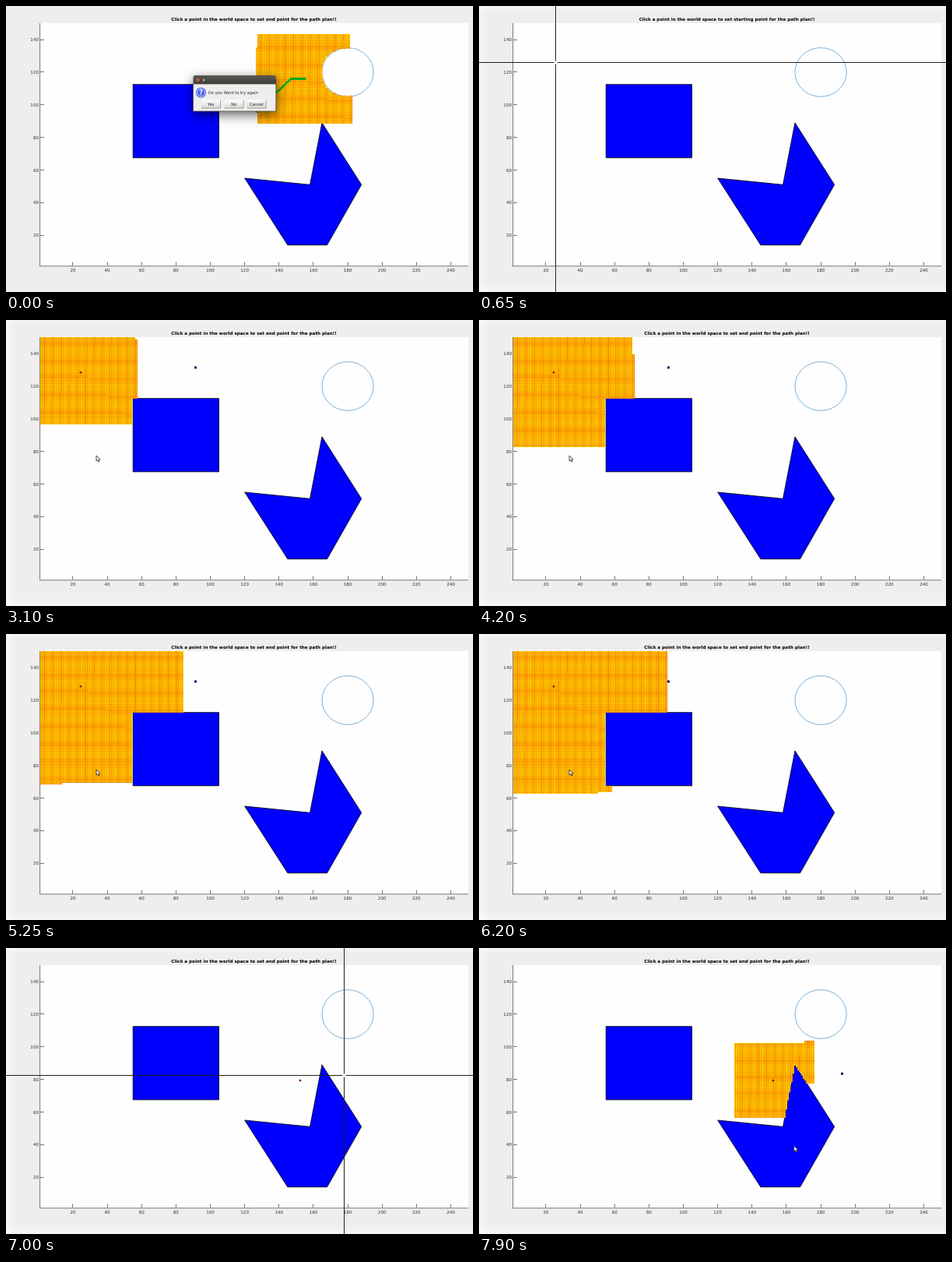
Write an HTML page with a canvas that moves like this. It is 600 px wide and 367 px high and loops after 8 s.

```html
<!DOCTYPE html>
<html lang="en">
<head>
<meta charset="utf-8">
<title>Path planner</title>
<style>
html, body { margin: 0; width: 100%; height: 100%; overflow: hidden; background: #efeeec; }
canvas { display: block; width: 600px; height: 367px; }
</style>
</head>
<body>
<canvas id="stage" width="600" height="367"></canvas>
<script>
const W = 600, H = 367, LOOP = 8000;
const COLS = 250, ROWS = 150;
const ctx = document.getElementById('stage').getContext('2d');
const SANS = '"DejaVu Sans", sans-serif';

// World to pixel
const UX = 2.207, UY = 2.092;
const px = x => 41.8 + x * UX;
const py = y => 336 - y * UY;

const POLY = [[120, 55], [158, 51], [165, 89], [188, 51], [168, 14], [145, 14]];

function inPoly(x, y) {
  let hit = false;
  POLY.forEach(([ax, ay], i) => {
    const [bx, by] = POLY[(i + 1) % POLY.length];
    if ((ay > y) !== (by > y) && x < ax + (y - ay) * (bx - ax) / (by - ay)) hit = !hit;
  });
  return hit;
}

function blocked(x, y) {
  if (x < 1 || y < 1 || x > COLS || y > ROWS) return true;
  if (x >= 55 && x <= 105 && y > 67 && y < 113) return true;
  if ((x - 180) ** 2 + (y - 120) ** 2 <= 225) return true;
  return inPoly(x, y);
}

// Breadth-first search over eight neighbours, counter-clockwise from west
const STEPS = [[-1, 0], [-1, -1], [0, -1], [1, -1], [1, 0], [1, 1], [0, 1], [-1, 1]];
const key = (x, y) => y * 256 + x;

function search(sx, sy) {
  const order = [[sx, sy]];
  const rank = new Map([[key(sx, sy), 0]]);
  const parent = [-1];
  for (let i = 0; i < order.length; i++) {
    const [x, y] = order[i];
    for (const [dx, dy] of STEPS) {
      const nx = x + dx, ny = y + dy, k = key(nx, ny);
      if (rank.has(k) || blocked(nx, ny)) continue;
      rank.set(k, order.length);
      parent.push(i);
      order.push([nx, ny]);
    }
  }
  const layer = document.createElement('canvas');
  layer.width = W;
  layer.height = H;
  const pen = layer.getContext('2d');
  pen.beginPath();
  pen.rect(44, 22, 550, 312);
  pen.clip();
  return { order, parent, layer, pen, drawn: 0, at: (x, y) => rank.get(key(x, y)) + 1 };
}

function drawSearch(s, count) {
  count = Math.floor(count);
  const g = s.pen;
  if (count < s.drawn) {
    g.clearRect(0, 0, W, H);
    s.drawn = 0;
  }
  for (; s.drawn < count; s.drawn++) {
    const [x, y] = s.order[s.drawn];
    const left = Math.round(px(x - 0.5)), top = Math.round(py(y + 0.5));
    g.fillStyle = '#f63c00';
    g.fillRect(left, top, Math.round(px(x + 0.5)) - left, Math.round(py(y - 0.5)) - top);
    g.fillStyle = '#fcec00';
    g.fillRect(px(x) - 0.92, py(y) - 0.87, 1.84, 1.74);
  }
  ctx.drawImage(s.layer, 0, 0);
}

function drawPath(s, x, y) {
  ctx.fillStyle = '#00a818';
  for (let i = s.at(x, y) - 1; i >= 0; i = s.parent[i]) {
    const [cx, cy] = s.order[i];
    ctx.fillRect(px(cx) - 1.5, py(cy) - 1.5, 3, 3);
  }
}

// Piecewise linear value; keys are [time, value]
function track(keys, t) {
  if (t <= keys[0][0]) return keys[0][1];
  for (let i = 1; i < keys.length; i++) {
    const [t0, a] = keys[i - 1], [t1, b] = keys[i];
    if (t < t1) return a + (b - a) * (t - t0) / (t1 - t0);
  }
  return keys[keys.length - 1][1];
}

const move = (keys, t) => [1, 2].map(n => track(keys.map(k => [k[0], k[n]]), t));

function line(x0, y0, x1, y1) {
  ctx.beginPath();
  ctx.moveTo(x0, y0);
  ctx.lineTo(x1, y1);
  ctx.stroke();
}

function text(str, x, y, size, align = 'center', weight = '') {
  ctx.font = `${weight} ${size}px ${SANS}`;
  ctx.textAlign = align;
  ctx.fillText(str, x, y);
}

function shape(points) {
  ctx.beginPath();
  points.forEach(([x, y]) => ctx.lineTo(x, y));
  ctx.closePath();
}

function drawFigure(goalTitle) {
  ctx.fillStyle = '#efeeec';
  ctx.fillRect(0, 0, W, H);
  ctx.fillStyle = '#fefefe';
  ctx.fillRect(44, 22, 550, 312);

  ctx.lineWidth = 1;
  ctx.strokeStyle = '#777';
  line(43.6, 22, 43.6, 334);
  line(43, 333.8, 594, 333.8);
  for (let x = 20; x <= 240; x += 20) line(Math.floor(px(x)) + 0.5, 328.5, Math.floor(px(x)) + 0.5, 333);
  for (let y = 20; y <= 140; y += 20) line(44, Math.floor(py(y)) + 0.5, 49, Math.floor(py(y)) + 0.5);

  ctx.fillStyle = '#333';
  for (let x = 20; x <= 240; x += 20) text(x, px(x), 341.3, 5.6);
  for (let y = 20; y <= 140; y += 20) text(y, 42, py(y) + 2.1, 5.6, 'right');
  ctx.fillStyle = '#000';
  const kind = goalTitle ? 'end' : 'starting';
  text(`Click a point in the world space to set ${kind} point for the path plan!!`, 318.6, 19.3, 5.62, 'center', 'bold');

  ctx.fillStyle = '#00f';
  ctx.strokeStyle = '#000';
  ctx.lineWidth = 0.8;
  shape([[55, 67.5], [105, 67.5], [105, 112.5], [55, 112.5]].map(([x, y]) => [px(x), py(y)]));
  ctx.fill();
  ctx.stroke();
  shape(POLY.map(([x, y]) => [px(x), py(y)]));
  ctx.fill();
  ctx.stroke();

  ctx.strokeStyle = '#5c9fce';
  ctx.beginPath();
  ctx.ellipse(px(180), py(120), 15 * UX, 15 * UY, 0, 0, 7);
  ctx.stroke();
}

// Pale soft rim around the window
function drawRim() {
  ctx.fillStyle = 'rgba(255,255,255,0.07)';
  for (let d = 2; d <= 12; d += 2) {
    ctx.fillRect(0, 0, W, d / 2);
    ctx.fillRect(0, H - d, W, d);
    ctx.fillRect(0, 0, d, H);
  }
}

function dot(x, y, color, size = 3) {
  ctx.fillStyle = color;
  ctx.fillRect(x - size / 2, y - size / 2, size, size);
}
const startDot = (x, y) => dot(x, y, '#7a1a08', 2.4);
const goalDot = (x, y) => dot(x, y, '#10185c');

function crosshair([x, y]) {
  x = Math.round(x) + 0.5;
  y = Math.round(y) - 0.5;
  ctx.strokeStyle = '#222';
  ctx.lineWidth = 1;
  line(0, y, x - 2, y);
  line(x + 2, y, W, y);
  line(x, 0, x, y - 2);
  line(x, y + 2, x, H);
}

function pointer([x, y]) {
  ctx.save();
  ctx.translate(x - 0.8, y - 4);
  shape([[0, 0], [0, 7], [1.6, 5.6], [2.8, 8], [4, 7.4], [2.9, 5.1], [5, 5]]);
  ctx.fillStyle = '#fff';
  ctx.strokeStyle = '#222';
  ctx.lineWidth = 0.8;
  ctx.fill();
  ctx.stroke();
  ctx.restore();
}

function disc(x, y, r, color) {
  ctx.fillStyle = color;
  ctx.beginPath();
  ctx.arc(x, y, r, 0, 7);
  ctx.fill();
}

function drawDialog() {
  ctx.save();
  ctx.shadowColor = 'rgba(0,0,0,0.65)';
  ctx.shadowBlur = 14;
  ctx.shadowOffsetY = 4;
  ctx.fillStyle = '#efeeec';
  ctx.fillRect(240.5, 90, 106.5, 45);
  ctx.restore();

  const bar = ctx.createLinearGradient(0, 89, 0, 100);
  bar.addColorStop(0, '#5c5a54');
  bar.addColorStop(1, '#3d3c38');
  ctx.fillStyle = bar;
  ctx.beginPath();
  ctx.roundRect(240.5, 89, 106.5, 11, [3, 3, 0, 0]);
  ctx.fill();
  ctx.strokeStyle = '#55534e';
  ctx.lineWidth = 0.8;
  ctx.strokeRect(240.6, 100, 106.2, 35);
  disc(246.5, 95, 2.9, '#302f2c');
  disc(246.5, 95, 2.4, '#e8743c');
  disc(254, 95, 2.9, '#302f2c');
  disc(254, 95, 2.3, '#85837c');
  ctx.strokeStyle = '#402010';
  line(245.5, 94, 247.5, 96);
  line(247.5, 94, 245.5, 96);

  disc(250.5, 111, 6.6, '#4a62e8');
  ctx.strokeStyle = '#e4e8ff';
  ctx.lineWidth = 0.9;
  ctx.beginPath();
  ctx.arc(250.5, 111, 5, 0, 7);
  ctx.stroke();
  ctx.fillStyle = '#fff';
  text('?', 250.5, 114, 8, 'center', 'bold');

  ctx.fillStyle = '#222';
  text('Do you Want to try again', 260, 113.2, 5.1, 'left');
  [['Yes', 251], ['No', 280.5], ['Cancel', 309.5]].forEach(([label, x]) => {
    const face = ctx.createLinearGradient(0, 120, 0, 131);
    face.addColorStop(0, '#fff');
    face.addColorStop(1, '#d9d8d6');
    ctx.fillStyle = face;
    ctx.fillRect(x, 120.5, 24.5, 10.5);
    ctx.strokeStyle = '#8d8c8a';
    ctx.lineWidth = 0.8;
    line(x, 131, x + 24.5, 131);
    line(x + 24.5, 121, x + 24.5, 131);
    ctx.fillStyle = '#222';
    text(label, x + 12.3, 127.6, 5.3);
  });
}

// Faint desktop showing through while the view is swapped
function drawVeil(a) {
  ctx.save();
  ctx.globalAlpha = a;
  const box = (color, x, y, w, h) => {
    ctx.fillStyle = color;
    ctx.fillRect(x, y, w, h);
  };
  ctx.globalCompositeOperation = 'multiply';
  box('#e8e8e8', 44.5, 23, 537.5, 308);
  box('#ebebeb', 582, 23, 10, 308);
  box('#e2e5e6', 0, 26, 44.5, 314);
  box('#dee0df', 252, 0, 348, 23);
  box('#e4e6e6', 44.5, 331, 537.5, 9);
  box('#e6e7e6', 0, 360, W, 7);
  box('#f4f4f4', 592, 23, 8, 337);
  ctx.globalCompositeOperation = 'source-over';
  ctx.fillStyle = 'rgba(255,243,220,0.65)';
  shape([[273.5, 155], [288, 189], [273.5, 189]]);
  ctx.fill();
  ctx.fillStyle = 'rgba(230,225,255,0.1)';
  shape([[267, 142], [273.5, 155], [273.5, 189], [247, 189]]);
  ctx.fill();
  ctx.fillStyle = 'rgba(170,190,165,0.4)';
  shape([[537, 358], [569, 351], [569, 358]]);
  ctx.fill();
  ctx.fillStyle = 'rgba(170,170,165,0.3)';
  text('▭ |R|C|x', 15, 356, 8, 'left');
  ctx.restore();
}

const first = search(155, 116);
const second = search(25, 129);
const third = search(153, 80);

const secondGrowth = [
  [930, 0], [1650, second.at(34, 147)], [3100, second.at(57, 147)],
  [5250, second.at(13, 69)], [6250, second.at(91, 131)]
];
const thirdGrowth = [[7080, 0], [7900, third.at(172, 103)], [8000, third.at(172, 103) + 130]];

function render(t) {
  const swap = t >= 6450 && t < 6700;
  const goalTitle = t < 300 || (t >= 720 && t < 6450) || t >= 6900;
  ctx.save();
  if (swap) {
    ctx.fillStyle = '#efeeec';
    ctx.fillRect(0, 0, W, H);
    ctx.translate(1.2, 1.2);
    ctx.scale(0.9945, 0.9885);
  }
  drawFigure(goalTitle);
  ctx.restore();
  if (t >= 300) drawRim();

  if (t < 300) {
    drawSearch(first, first.at(127, 96));
    drawPath(first, 127, 96);
    drawDialog();
  } else if (t < 930) {
    if (t >= 720) startDot(96, 67);
    crosshair(move([[300, 240, 120], [600, 98, 73], [660, 98, 73], [720, 96, 67], [760, 96, 67], [920, 243, 61]], t));
  } else if (t < 6450) {
    drawSearch(second, track(secondGrowth, t));
    startDot(96, 67.3);
    goalDot(243.5, 61);
    if (t >= 6350) {
      drawPath(second, 91, 131);
      drawDialog();
    } else {
      pointer(move([[930, 243, 61], [1500, 123, 175], [1680, 123, 175], [1900, 116.8, 178]], t));
    }
  } else if (swap) {
    drawVeil(track([[6450, 0.6], [6550, 1], [6600, 1], [6700, 0.1]], t));
    pointer([382, 174]);
  } else if (t < 7080) {
    if (t >= 6900) startDot(378, 170);
    crosshair(move([[6700, 382, 174], [6850, 378, 170], [6900, 378, 170], [7060, 466, 161]], t));
  } else {
    drawSearch(third, track(thirdGrowth, t));
    startDot(378, 170);
    goalDot(466.5, 161.3);
    pointer(move([[7080, 466, 161], [7800, 405.5, 258]], t));
  }
}

function tick(now) {
  render(now % LOOP);
  requestAnimationFrame(tick);
}
render(0);
requestAnimationFrame(tick);
</script>
</body>
</html>
```
